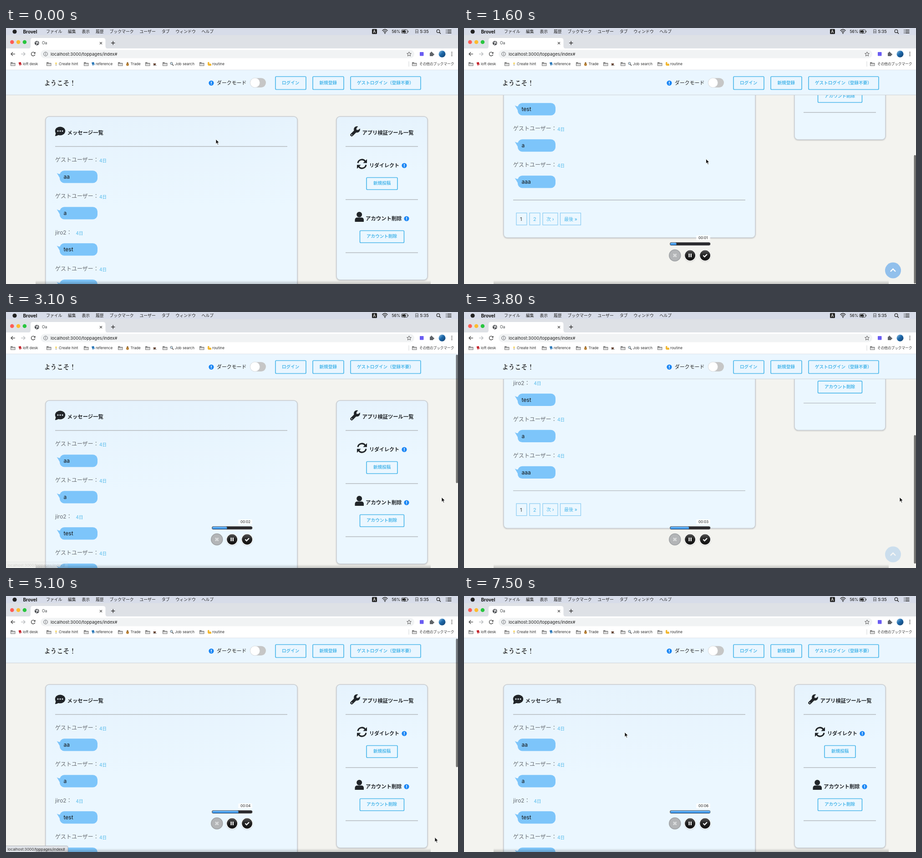
Recreate the animation shown at these times as an HTML page. Size 993 by 564 pixels, loop 7600 ms.

```html
<!DOCTYPE html>
<html lang="ja">
<head>
<meta charset="utf-8">
<style>
html, body { margin: 0; width: 100%; height: 100%; overflow: hidden; background: #f3f3ef; }
svg { display: block; width: 993px; height: 564px; }
text { font-family: Inter, "Noto Sans CJK JP", "Noto Sans CJK", sans-serif; white-space: pre; }
.mincho { font-family: "Noto Serif CJK JP", "Noto Sans CJK JP", serif; }
</style>
</head>
<body>
<svg id="stage" viewBox="0 0 993 564">
  <defs>
    <linearGradient id="panel" x2="0" y2="1"><stop stop-color="#e6f3fd"/><stop offset=".35" stop-color="#ebf7ff"/></linearGradient>
    <linearGradient id="dock" x2="0" y2="1"><stop stop-opacity="0"/><stop offset="1" stop-opacity=".2"/></linearGradient>
    <linearGradient id="fill" x2="0" y2="1"><stop stop-color="#7cc4ff"/><stop offset="1" stop-color="#1f7fdc"/></linearGradient>
    <linearGradient id="knob" x2="0" y2="1"><stop stop-color="#555"/><stop offset=".5" stop-color="#222"/><stop offset="1" stop-color="#111"/></linearGradient>
    <linearGradient id="avatar" x2="1" y2="1"><stop stop-color="#9cc9e8"/><stop offset=".45" stop-color="#1d69ab"/><stop offset="1" stop-color="#143d68"/></linearGradient>
    <filter id="soft" x="-10%" y="-10%" width="120%" height="120%"><feDropShadow dx="0" dy="1" stdDeviation="1.2" flood-opacity=".2"/></filter>
    <clipPath id="view"><rect y="148" width="993" height="416"/></clipPath>
    <clipPath id="track"><rect x="453" y="473" width="88" height="5.6" rx="2.8"/></clipPath>
  </defs>
  <g clip-path="url(#view)"><g id="page"></g></g>
  <g id="window"></g>
  <g id="top"><circle cx="942.5" cy="534" r="17.5" fill="#92c0ec"/>
    <path d="M937 536.5l5.5-5.5 5.5 5.5" fill="none" stroke="#fff" stroke-width="2.4"/></g>
  <rect id="bar" x="988.5" width="4.5" height="283" rx="2" fill="#000" fill-opacity=".53"/>
  <g id="status"></g>
  <rect x="65" y="556" width="868" height="8" fill="url(#dock)"/>
  <g id="recorder"></g>
  <g id="arrow"><path d="M0 0v10.5l2.4-2.2 1.7 4 1.8-.8-1.7-3.8h3.3z" fill="#111" stroke="#fff" stroke-width=".9"/></g>
  <g id="hand"><path d="M-1 1Q0-.6 1 1V5Q2 4 3 5.3Q4.4 4.6 5 6Q6.5 5.6 6.5 7.3L6 11 4.8 13.5H-1.2L-4.4 8.6Q-4.5 7-2.8 7.6L-1 9z" fill="#fff" stroke="#111" stroke-width="1"/></g>
</svg>
<script>
const $ = id => document.getElementById(id);
const BLUE = '#50b9eb', DARK = '#212529', GREY = '#5f6368';

// Drawing helpers; text is placed by its left edge and vertical centre.
const text = (x, cy, size, str, fill = DARK, weight = 400, extra = '') =>
  `<text x="${x}" y="${cy + size * .365}" font-size="${size}" font-weight="${weight}" fill="${fill}" ${extra}>${str}</text>`;
const rect = (x, y, w, h, fill, r = 0, extra = '') =>
  `<rect x="${x}" y="${y}" width="${w}" height="${h}" rx="${r}" fill="${fill}" ${extra}/>`;
const dot = (x, y, r, fill, extra = '') => `<circle cx="${x}" cy="${y}" r="${r}" fill="${fill}" ${extra}/>`;
const line = (d, color, w = 1.2, extra = '') => `<path d="${d}" fill="none" stroke="${color}" stroke-width="${w}" ${extra}/>`;
const shape = (d, fill) => `<path d="${d}" fill="${fill}"/>`;
const rule = (x1, x2, y) => line(`M${x1} ${y}H${x2}`, '#b4babe', 1.4);
const info = (x, y) => dot(x, y, 5.6, '#1a86f5') + rect(x - .8, y - 3.3, 1.6, 4, '#fff') + rect(x - .8, y + 1.6, 1.6, 1.6, '#fff');
const button = (x, y, w, h, tx, label) =>
  rect(x, y, w, h, 'none', 2, `stroke="${BLUE}" stroke-width="1.7"`) + text(tx, y + h / 2 - .8, 9.6, label, BLUE, 700);
const card = (x, w, h) => rect(x, 195, w, h, 'url(#panel)', 8, 'stroke="#c7ccd1" stroke-width="1.5" filter="url(#soft)"');

function message(user, body, i) {
  const y = 291 + 80 * i, guest = user === 'ゲストユーザー';
  return text(108, y, 12, user + '：', '#666b70') + text(guest ? 205 : 153.5, y + 1, 9.8, '4日', BLUE) +
    shape(`M111.5 ${y + 28.5}Q117 ${y + 32} 124 ${y + 30}L121 ${y + 45}Q116 ${y + 35} 111.5 ${y + 28.5}`, '#7dc5fa') +
    rect(118, y + 23.2, 83, 27.3, '#7dc5fa', 10) + text(126.5, y + 37, 12, body, '#111');
}

function page() {
  const guest = 'ゲストユーザー';
  const pager = [[115, 23, '1', 123], [144, 23, '2', 152], [173, 33, '次 ›', 181], [211.5, 45, '最後 »', 220]];
  return card(87, 553, 576) + card(726, 200, 360) +
    `<ellipse cx="119" cy="227" rx="11.2" ry="9.4" fill="${DARK}"/>` + shape('M110 230L107.8 238Q113 238 117 234z', DARK) +
    [114, 119, 124].map(x => dot(x, 227, 1.5, '#eef7fe')).join('') +
    text(134.5, 231, 11.4, 'メッセージ一覧', DARK, 700) + rule(108, 618, 261) +
    [[guest, 'aa'], [guest, 'a'], ['jiro2', 'test'], [guest, 'a'], [guest, 'aaa']].map(([u, b], i) => message(u, b, i)).join('') +
    rule(108, 618, 688) +
    pager.map(([x, w, s, tx], i) => rect(x, 716.5, w, 26.5, 'none', 0, 'stroke="#86caf2" stroke-width="1.2"') +
      text(tx, 730, i < 2 ? 11 : 10, s, i ? BLUE : '#333', i > 1 ? 500 : 400)).join('') +
    // wrench
    line('M759.5 235.5L769 226', DARK, 6.4, 'stroke-linecap="round"') + dot(771, 223.5, 6.9, DARK) +
    shape('M770 224.5L770 220.5 775.5 215 780 219.5 774 224.5z', '#e7f4fd') + dot(759.6, 235.4, 1.1, '#e7f4fd') +
    text(782.5, 231, 11.3, 'アプリ検証ツール一覧', DARK, 700) + rule(746, 905, 261) +
    // refresh
    line('M773 297.5A9 9 0 0 1 789 293.5M791 301.5A9 9 0 0 1 775 305.5', DARK, 3.1) +
    shape('M793 289V297.6H784.4zM771 310V301.4H779.6z', DARK) +
    text(798, 302.5, 11, 'リダイレクト', DARK, 700) + info(875, 303) + button(792, 329.5, 68, 26.5, 807, '新規投稿') + rule(746, 905, 378) +
    // person
    dot(776.2, 411, 6, DARK) + shape('M766.5 427V423Q766.5 417.5 772 417.5H780.5Q786 417.5 786 423V427z', DARK) +
    text(790, 420, 11.4, 'アカウント削除', DARK, 700) + info(880, 420) + button(777.5, 446.5, 97, 26.5, 792, 'アカウント削除') + rule(746, 905, 495);
}

function browser() {
  const menus = [[88, 'ファイル'], [136, '編集'], [166.5, '表示'], [197, '履歴'], [227.5, 'ブックマーク'],
    [293.5, 'ユーザー'], [342, 'タブ'], [372.5, 'ウィンドウ'], [429.5, 'ヘルプ']];
  const marks = [[10, 'loft desk', 37], [89, 'Create hint', 116], [171, 'reference', 197], [246, 'Trade', 273.5],
    [306, '', 0], [344, 'Job search', 371], [425, 'routine', 453], [892, '', 0]];
  const folder = x => shape(`M${x} 75.5h4l1.3 1.4h5.2v6.7h-10.5z`, '#777') + rect(x + 1, 78.5, 8.5, 4.1, '#ddd');
  const book = (x, c) => shape(`M${x - 3} 76l5-1 2 6-5 2z`, c) + line(`M${x - 2} 82l5-2`, '#eee', .8);
  return rect(0, 0, 993, 16, '#d7dce9') + rect(0, 15.5, 993, 30, '#dee1e6') + rect(0, 45, 993, 47, '#fff') +
    dot(19, 8, 4.6, '#222') + text(37.5, 8, 10, 'Brovel', '#111', 700) +
    menus.map(([x, s]) => text(x, 8, 8.9, s, '#222', 500)).join('') +
    rect(804, 2.2, 11, 11, '#222', 1.5) + text(806.3, 7.8, 8.5, 'A', '#fff', 500) +
    line('M826.5 6Q832.5 0 838.5 6M828.6 8.3Q832.5 4.4 836.4 8.3M830.6 10.4Q832.5 8.6 834.4 10.4', '#222', 1.3) + dot(832.5, 12, 1, '#222') +
    text(847.5, 8, 8.4, '56%', '#222', 500) +
    rect(869, 4, 13, 7.5, 'none', 1.5, 'stroke="#333"') + rect(870.5, 5.5, 5, 4.5, '#222') + rect(882.8, 6.3, 1.3, 3, '#333') +
    shape('M877.5 2.5l-4 6h2.6l-1 5 4.4-6.4h-2.7z', '#222') +
    text(898, 8, 9, '日 5:35', '#222', 500) +
    dot(949.5, 7, 3.3, 'none', 'stroke="#222" stroke-width="1.2"') + line('M952 9.5l3 3.2', '#222', 1.4) +
    line('M969.5 4.5h9M969.5 7.8h9M969.5 11h9M966.5 4.5h1.5M966.5 7.8h1.5M966.5 11h1.5', '#222', 1.3) +
    // tab
    ['#ff5d55', '#fdbc2e', '#28c63f'].map((c, i) => dot(13.3 + 13.8 * i, 31, 4.3, c)).join('') +
    shape('M49 45.5Q54 45 54 40V27Q54 22 59 22H213Q218.5 22 218.5 27V40Q218.5 45 224 45.5z', '#fff') +
    dot(67.8, 33.3, 4.9, '#4a4d51') + line('M64.5 31l3 1 .5 2.5-2 2M69 29.5l-.5 2 3 2.5', '#fff', 1.3) +
    text(79, 33.3, 8.6, 'Oa', '#3c4043') + line('M206 30.8l5 5M211 30.8l-5 5', '#444', 1.2) +
    line('M231 33h8.4M235.2 28.8v8.4', '#333', 1.4) +
    // address row
    line('M20 57.3H11M15 53.3l-4 4 4 4', '#444', 1.3) + line('M33 57.3h9M38 53.3l4 4-4 4', '#b5b8bb', 1.3) +
    line('M63.2 55A4.2 4.2 0 1 0 63.7 58.5', '#444', 1.3) + shape('M64.6 52.5v4h-4z', '#444') +
    rect(76, 48.3, 821, 18.2, '#f1f3f4', 9) + dot(87, 57.3, 4.3, 'none', `stroke="${GREY}" stroke-width="1"`) +
    line('M87 56.6v3M87 54.6v1.1', GREY, 1.1) + text(98, 57.3, 9.5, 'localhost:3000/toppages/index#', '#222') +
    line('M885.5 52.6l1.4 3.2 3.4.3-2.6 2.3.8 3.4-3-1.8-3 1.8.8-3.4-2.6-2.3 3.4-.3z', '#555', 1) +
    rect(909, 53, 8.5, 8.5, '#6a5cf2', 1) +
    rect(931, 54.5, 7.5, 7.5, GREY, 1) + dot(934.7, 54, 1.8, GREY) + dot(939, 58.3, 1.8, GREY) +
    dot(958, 57.3, 7.5, 'url(#avatar)') + [53.5, 57.3, 61].map(y => dot(979.5, y, 1.1, '#444')).join('') +
    // bookmarks
    marks.map(([x, s, tx]) => folder(x) + (s && text(tx, 79.3, 8.2, s, '#333'))).join('') +
    book(30.5, '#c4232b') + dot(110, 78, 2.2, '#f8dc7a') + rect(109, 80.5, 2, 2.5, '#aaa') + book(191, '#2b78b8') +
    dot(267, 80.5, 3, '#b98237') + rect(265.5, 75.5, 3, 2.6, '#8a5c22') +
    shape('M323.5 78h6l-1 4h-4z', '#6b4a3a') + line('M323 82.5h8', '#999', 1) +
    dot(363.5, 78, 2.5, '#cfe6f5', 'stroke="#555" stroke-width=".9"') + line('M365.3 80l2.7 3', '#444', 1.4) +
    shape('M443.5 75h3v4q3-2 4.5 1v3h-6q-3-1-1.5-8', '#f2b72f') +
    line('M885 73.5v11.5', '#d0d3d6', 1) + text(908, 79.3, 7.65, 'その他のブックマーク', '#333') +
    // site header
    rect(0, 92, 993, 56, '#eaf6ff') + line('M0 92.3H993', '#dcdfe2', .8) + line('M0 147.5H993', '#cdd2d6', 1) +
    text(83.5, 120.5, 14, 'ようこそ！', '#222', 600, 'class="mincho"') +
    info(451, 121.3) + text(463, 121, 10.9, 'ダークモード', '#222', 500) +
    rect(536, 110.3, 35, 20.6, '#c6c6c6', 10.3) + dot(547, 120.6, 10.6, '#fff', 'stroke="#d5d8db" stroke-width=".8"') +
    button(592, 107, 67, 28.5, 606, 'ログイン') + button(674, 107, 68, 28.5, 688.5, '新規登録') +
    button(757, 107, 154, 28.5, 771, 'ゲストログイン（登録不要）');
}

const recorder = () =>
  rect(510, 457, 31, 11, '#fff', 2, 'fill-opacity=".8"') + text(515, 462.3, 7.9, '00:00', '#222', 400, 'id="clock"') +
  rect(452, 472, 89.5, 7.3, '#2b2b2e', 3.6, 'stroke="#fff" stroke-opacity=".5"') +
  '<g clip-path="url(#track)"><rect id="done" x="453" y="473" height="5.6" rx="2.8" fill="url(#fill)"/></g>' +
  dot(463.3, 501, 12.5, '#b3b5b7', 'stroke="#9da0a3" stroke-width="1.5"') +
  line('M460 497.7l6.6 6.6M466.6 497.7l-6.6 6.6', '#d8dadb', 2.8) +
  [496.7, 529.7].map(x => dot(x, 501, 12, 'url(#knob)', 'stroke="#fff" stroke-width="1.2" filter="url(#soft)"')).join('') +
  line('M494.6 497v8M498.8 497v8', '#fff', 2.3) + line('M525.5 501l3 3 5.5-5.5', '#fff', 2.4);

$('page').innerHTML = page();
$('window').innerHTML = browser();
$('recorder').innerHTML = recorder();
$('status').innerHTML = rect(-3, 550.5, 139, 16, '#dfe2e7', 3, 'stroke="#b6babf" filter="url(#soft)"') +
  text(3.5, 557.8, 8.2, 'localhost:3000/toppages/index#', '#333');

// Motion
const part = (t, start, length) => Math.min(1, Math.max(0, (t - start) / length));
const swing = p => .5 - Math.cos(Math.PI * p) / 2;
const glide = p => 1 - (1 - p) ** 2;
const shown = (t, from, to, d) => part(t, from, d) - part(t, to, d);
const scrollAt = t => 309 * (glide(part(t, 850, 575)) - swing(part(t, 2246, 500)) +
  glide(part(t, 3350, 575)) - swing(part(t, 4550, 500)));

const path = [[0, 461, 245], [1450, 461, 245], [2050, 943, 541], [2800, 943, 541], [3100, 957, 408],
  [3950, 957, 408], [4300, 942, 531.5], [5500, 942, 531.5], [7100, 353, 300], [7600, 353, 300]];
function pointer(t) {
  const i = path.findIndex(k => k[0] > t), [t0, x0, y0] = path[i - 1], [t1, x1, y1] = path[i];
  const p = swing((t - t0) / (t1 - t0));
  return [x0 + (x1 - x0) * p, y0 + (y1 - y0) * p];
}

function draw() {
  // Steps of 100 ms, with a small lead so a late repaint lands on its own step.
  const t = Math.floor((performance.now() + 20) / 100) * 100 % 7600;
  const s = scrollAt(t), [x, y] = pointer(t);
  const pointing = (t >= 2000 && t < 2750) || (t >= 4250 && t < 4950);
  $('page').setAttribute('transform', `translate(0 ${-s})`);
  $('bar').setAttribute('y', 94 + s * .602);
  $('bar').setAttribute('opacity', shown(t, 800, 1900, 120) + shown(t, 2180, 4400, 120) + shown(t, 4520, 5520, 120));
  $('top').setAttribute('opacity', shown(t, 1250, 2600, 250) + shown(t, 3700, 4800, 250));
  $('status').setAttribute('opacity', shown(t, 2050, 2950, 180) + shown(t, 4550, 5350, 180));
  $('recorder').setAttribute('opacity', t < 300 ? 0 : 1);
  $('done').setAttribute('width', 88 * part(t, 500, 7000));
  $('clock').textContent = '00:0' + Math.max(0, Math.floor((t - 510) / 1000));
  for (const id of ['arrow', 'hand']) {
    $(id).setAttribute('transform', `translate(${x} ${y})`);
    $(id).setAttribute('visibility', (id === 'hand') === pointing ? 'visible' : 'hidden');
  }
  requestAnimationFrame(draw);
}
draw();
</script>
</body>
</html>
```
